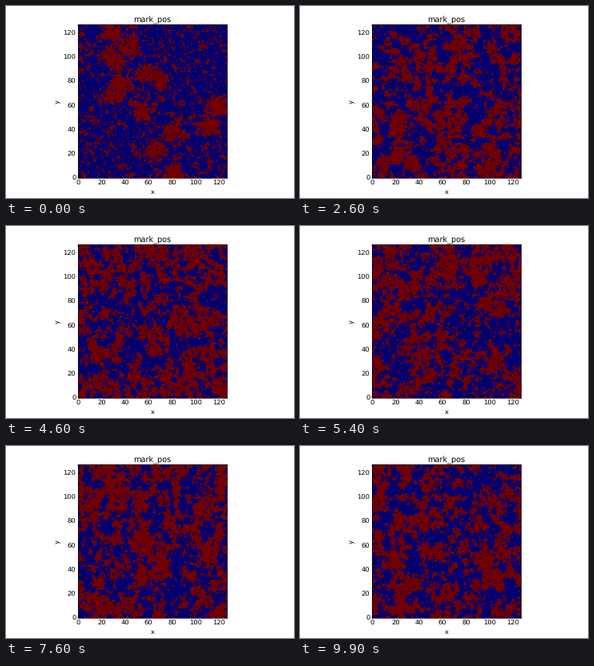
Animation, 360 px wide and 240 px high, one loop 10 s. Source, as a matplotlib script:

```python
import numpy as np
import matplotlib.pyplot as plt
from matplotlib.animation import FuncAnimation

N = 128
FRAMES = 100
SWEEPS = 10
FADE = 4
HOT, WARM = 0.3, 0.39
BLUE, RED = np.array([[0, 0, 114], [114, 0, 0]], dtype=np.uint8)

plt.rcParams.update({
    "font.family": "DejaVu Sans", "font.size": 12.5, "axes.titlesize": 14.7,
    "axes.titlepad": 6, "axes.labelpad": 4.5, "axes.linewidth": 1,
    "text.hinting": "none",
    "xtick.direction": "in", "ytick.direction": "in",
    "xtick.top": True, "ytick.right": True,
    "xtick.major.size": 4, "ytick.major.size": 4,
    "xtick.major.width": 0.5, "ytick.major.width": 0.5,
    "xtick.major.pad": 4, "ytick.major.pad": 4,
})

rng = np.random.default_rng(7)
yy, xx = np.mgrid[:N, :N]
parity = (xx + yy) % 2 == 0


def bumps(points, size):
    """Largest of a set of round bumps centred on the points."""
    return np.max([np.exp(-((xx - x) ** 2 + (yy - y) ** 2) / (2 * size ** 2))
                   for x, y in points], axis=0)


# The opening state is mostly blue with a few red islands
islands = [(36, 77), (31, 68), (70, 79), (58, 87), (54, 54), (28, 118), (44, 108),
           (29, 99), (80, 36), (65, 23), (118, 58), (110, 42), (80, 4)]
opening = 2.8 * bumps(islands, 4.2) - 0.3


def sweep(spin, beta, field):
    """One heat-bath pass over both halves of the checkerboard."""
    for half in (parity, ~parity):
        near = sum(np.roll(spin, s, a) for s in (1, -1) for a in (0, 1))
        up = rng.random((N, N)) < 1 / (1 + np.exp(-2 * beta * (near + field)))
        spin = np.where(half, np.where(up, 1, -1), spin)
    return spin


def simulate():
    spin = np.where(rng.random((N, N)) < 0.25, 1, -1)
    for _ in range(40):
        spin = sweep(spin, HOT, opening)
    states = [spin]
    for k in range(1, FRAMES):
        start = max(0, 1 - k / FADE)
        beta = WARM + (HOT - WARM) * start
        for _ in range(SWEEPS):
            balance = 0.35 * (1 - start) * (0.04 - spin.mean())
            spin = sweep(spin, beta, start * opening + balance)
        states.append(spin)
    return states


def to_rgb(spin):
    cells = np.where(spin[:-1, :-1, None] > 0, RED, BLUE)
    return cells.repeat(3, axis=0).repeat(3, axis=1)


states = simulate()

fig = plt.figure(figsize=(7.5, 5), dpi=48, facecolor="white")
ax = fig.add_axes([0.25, 0.1035, 186.3 / 360, 0.8])
image = ax.imshow(to_rgb(states[0]), origin="lower", extent=(0, N - 1, 0, N - 1),
                  aspect="auto", interpolation="hanning")
ax.set(title="mark_pos", xlabel="x", ylabel="y",
       xticks=range(0, 121, 20), yticks=range(0, 121, 20),
       xlim=(0, N - 1), ylim=(0, N - 1))


def update(k):
    image.set_data(to_rgb(states[k]))
    return [image]


anim = FuncAnimation(fig, update, frames=FRAMES, interval=100,
                     repeat=True, repeat_delay=0, blit=False)
plt.show()
```
